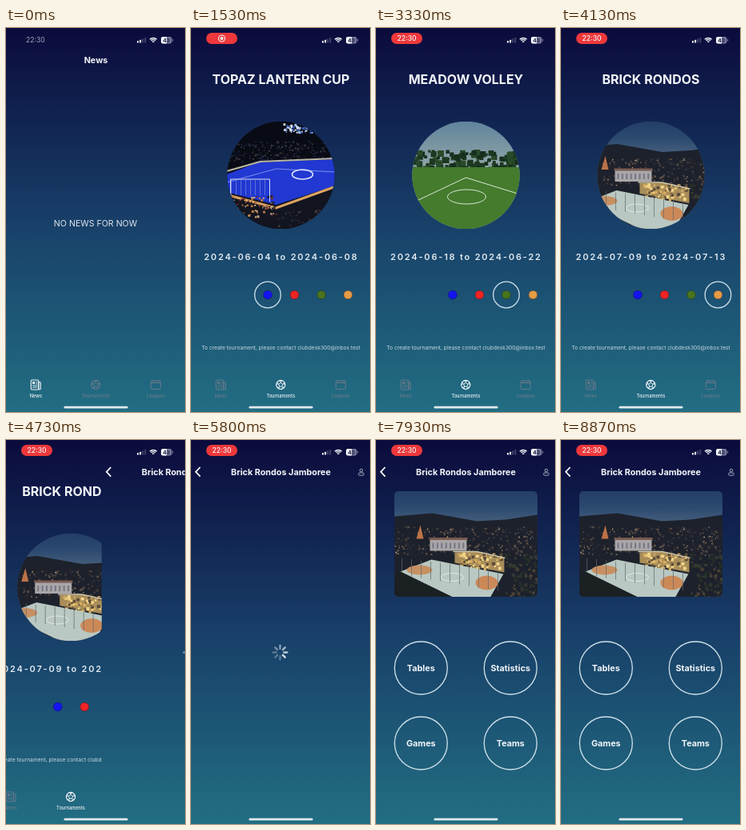
Write an HTML page with a canvas that moves like this. It is 224x480 px and loops after 8940 ms.

```html
<!DOCTYPE html>
<html lang="en">
<head>
<meta charset="utf-8">
<title>Tournament app</title>
<style>
html, body { margin: 0; width: 100%; height: 100%; overflow: hidden; background: #0b0b3c; }
canvas { display: block; }
</style>
</head>
<body>
<canvas id="stage"></canvas>
<script>
const W = 224, H = 480, LOOP = 8940;
const TAB_AT = 600, PUSH_AT = 4650, PUSH_TIME = 430, LOADED_AT = 6300;
const SWIPE_AT = 1750, SWIPE_GAP = 850, SWIPE_TIME = 500;
const PILL_AT = 300, PILL_CLOCK_AT = 3200;
const CX = 112.5, DOT_GAP = 33.5;
const WHITE = '#f1f4f8', DIM = '#66798a';

const canvas = document.getElementById('stage');
const c = canvas.getContext('2d');
const ratio = window.devicePixelRatio || 1;
canvas.width = W * ratio;
canvas.height = H * ratio;
canvas.style.width = W + 'px';
canvas.style.height = H + 'px';

const cups = [
  { name: 'TOPAZ LANTERN CUP', dates: '2024-06-04 to 2024-06-08', color: '#1414f2', photo: arena },
  { name: 'PANNA JUBILEE', dates: '2024-06-11 to 2024-06-15', color: '#f02424', photo: redCourt },
  { name: 'MEADOW VOLLEY', dates: '2024-06-18 to 2024-06-22', color: '#47741d', photo: greenPitch },
  { name: 'BRICK RONDOS', dates: '2024-07-09 to 2024-07-13', color: '#e59c45', photo: town }
];

const progress = (t, from, time) => Math.max(0, Math.min(1, (t - from) / time));
const smooth = p => p * p * (3 - 2 * p);
const easeOut = p => 1 - (1 - p) ** 3;
const repeat = (n, fn) => { for (let i = 0; i < n; i++) fn(i); };

function scoped(fn) {
  c.save();
  fn();
  c.restore();
}

function text(s, x, y, size, { weight = 400, color = WHITE, spacing = 0 } = {}) {
  c.font = `${weight} ${size}px Inter, Roboto, sans-serif`;
  c.letterSpacing = spacing + 'px';
  c.textAlign = 'center';
  c.fillStyle = color;
  c.fillText(s, x + spacing / 2, y + size * 0.364);
}

function fill(color, trace) {
  c.beginPath();
  trace();
  c.fillStyle = color;
  c.fill();
}

function stroke(color, width, trace) {
  c.beginPath();
  trace();
  c.strokeStyle = color;
  c.lineWidth = width;
  c.stroke();
}

function trace(xy) {
  for (let i = 0; i < xy.length; i += 2) c.lineTo(xy[i], xy[i + 1]);
}

const poly = (color, ...xy) => fill(color, () => trace(xy));
const line = (color, width, ...xy) => stroke(color, width, () => trace(xy));
const rect = (color, x, y, w, h, r = 0) => fill(color, () => c.roundRect(x, y, w, h, r));
const box = (color, width, x, y, w, h, r = 0) => stroke(color, width, () => c.roundRect(x, y, w, h, r));
const disc = (color, x, y, rx, ry = rx) => fill(color, () => c.ellipse(x, y, rx, ry, 0, 0, 7));
const ring = (color, width, x, y, rx, ry = rx) => stroke(color, width, () => c.ellipse(x, y, rx, ry, 0, 0, 7));

function gradient(y1, ...colors) {
  const g = c.createLinearGradient(0, 0, 0, y1);
  colors.forEach((color, i) => g.addColorStop(i / (colors.length - 1), color));
  return g;
}

// Seeded scatter of small patches: crowds, foliage and lights.
function scatter(count, size, x, y, w, h, ...colors) {
  let seed = count + 1;
  const random = () => (seed = seed * 16807 % 2147483647) / 2147483647;
  repeat(count, () => {
    const s = size * (0.4 + random() * 0.6);
    rect(colors[Math.floor(random() * colors.length)], x + random() * w, y + random() * h, s, s);
  });
}

// Photos fill a box of 180 x 134.
function arena() {
  rect('#090b14', 0, 0, 180, 134);
  scatter(260, 2, 22, 24, 136, 26, '#263049', '#33364a', '#4b4044', '#182443');
  scatter(60, 3, 93, 2, 36, 11, '#e8f0ff', '#a8c4ff', '#3a5ab0');
  poly('#2138d2', 22, 66, 62, 51, 158, 47, 158, 80, 86, 107, 22, 92);
  line('#b9b7a6', 2, 22, 62, 64, 50, 158, 46);
  line('#93a6f2', 0.8, 22, 76, 84, 59, 158, 63);
  ring('#dce5ff', 1.5, 117, 66, 13, 6);
  poly('#12141f', 22, 88, 84, 104, 158, 80, 158, 134, 22, 134);
  repeat(8, i => line('#8396d8', 0.6, 28 + i * 6, 73, 28 + i * 6, 92));
  line('#d6dcf0', 1, 27, 94, 27, 72, 76, 72, 76, 100);
  line('#dda561', 3, 24, 92, 84, 108, 156, 82);
  scatter(110, 3, 22, 92, 62, 28, '#b4713f', '#6d3030', '#171a2a', '#c9a87f');
  scatter(50, 3, 84, 110, 74, 24, '#222a3f', '#11131e', '#443a3a');
}

function redCourt() {
  rect('#1c2227', 0, 0, 180, 134);
  scatter(260, 4, 22, 0, 136, 46, '#25312d', '#2c3330', '#161b1d', '#343b3a');
  poly('#d8444c', 22, 35, 50, 28, 158, 57, 158, 84, 54, 119, 22, 102);
  poly('#252a35', 56, 27, 158, 38, 158, 58, 72, 36);
  repeat(3, i => rect('#a5a8b4', 74 + i * 26, 28 + i * 7, 5, 8));
  repeat(4, i => rect('#7698d8', 30 + i * 34, 73 - i * 3, 10, 2));
  disc('#315ea8', 56, 58, 13, 4.5);
  ring('#dbe2ed', 1.4, 56, 58, 13, 4.5);
  const curve = () => {
    c.moveTo(50, 121);
    c.bezierCurveTo(48, 88, 84, 84, 158, 77);
  };
  fill('#59616b', () => { curve(); c.lineTo(158, 134); c.lineTo(50, 134); });
  stroke('#4a80d0', 1.8, curve);
  poly('#454b51', 22, 102, 54, 119, 80, 134, 22, 134);
  repeat(9, i => line('#78838c', 0.6, 112 + i * 5, 80, 112 + i * 5, 118));
  line('#bdc7cd', 1, 112, 110, 113, 80, 148, 77, 148, 106);
  scatter(120, 6, 70, 108, 78, 28, '#303f32', '#222e27', '#465240');
}

function greenPitch() {
  rect(gradient(60, '#60849d', '#93a7a8'), 0, 0, 180, 134);
  scatter(130, 8, 22, 35, 136, 22, '#1d3821', '#294a29', '#172e1d');
  rect('#447b2d', 0, 57, 180, 77);
  line('#d8e7d3', 1, 22, 102, 90, 70, 158, 91);
  ring('#d8e7d3', 1, 91, 94, 24, 9);
}

function town() {
  rect(gradient(42, '#233f68', '#2c4a70', '#48607c'), 0, 0, 180, 134);
  poly('#1d212b', 0, 32, 48, 28, 104, 38, 140, 36, 180, 30, 180, 134, 0, 134);
  scatter(280, 3, 0, 44, 180, 36, '#2b2a30', '#493f3d', '#242832', '#5d5149');
  scatter(45, 1.5, 0, 44, 180, 36, '#d6a873', '#a37855', '#c9c0b3');
  poly('#bd7247', 28, 60, 33, 43, 37, 60);
  rect('#aaa6a8', 45, 61, 46, 14);
  line('#785b50', 3, 44, 60, 92, 60);
  repeat(8, i => rect('#747684', 48 + i * 5.4, 65, 2, 7));
  poly('#a98d59', 76, 77, 104, 76, 138, 84, 138, 102, 76, 90);
  scatter(70, 4, 78, 77, 56, 20, '#f2d589', '#594a3a', '#d6ad60');
  line('#cdc6aa', 1.3, 74, 76, 104, 76, 139, 84);
  poly('#b9c8c2', 8, 101, 47, 86, 137, 104, 120, 134, 75, 134);
  disc('#c79062', 32, 99, 16, 6);
  disc('#cc8958', 116, 115, 14, 9);
  ring('#eef1e7', 0.8, 73, 108, 14, 5);
  repeat(11, i => line('#61696b', 0.7, 10 + i * 12, 84 + i * 1.5, 10 + i * 12, 105 + i * 2));
  poly('#1b2023', 0, 104, 8, 101, 76, 134, 0, 134);
  scatter(90, 4, 138, 78, 42, 56, '#263128', '#343833', '#4f4336');
}

function background() {
  rect(gradient(H, '#0b0b3c', '#183f68', '#226e83'), 0, 0, W, H);
}

function newsIcon(x, y, color) {
  box(color, 1.1, x - 6, y - 6, 9.5, 12, 1.2);
  box(color, 1.1, x + 3.5, y - 3.5, 2.5, 9.5, 1.2);
  rect(color, x - 4.2, y - 4, 3, 3);
  repeat(4, i => line(color, 0.9, x - (i < 2 ? 0 : 4.2), y - 3.5 + i * 2.2, x + 2, y - 3.5 + i * 2.2));
}

function ballIcon(x, y, color) {
  ring(color, 1.1, x, y, 5.6);
  repeat(5, i => scoped(() => {
    c.translate(x, y);
    c.rotate(i * Math.PI * 0.4);
    line(color, 0.9, -1.4, -1.9, 0, -2.4, 1.4, -1.9);
    line(color, 0.9, 0, -2.4, 0, -4.2);
    line(color, 0.9, -2.2, -5.2, 0, -4.2, 2.2, -5.2);
  }));
}

function calendarIcon(x, y, color) {
  box(color, 1, x - 6, y - 5, 12, 10.5, 1);
  line(color, 1.2, x - 6, y - 2.6, x + 6, y - 2.6);
  repeat(2, i => line(color, 1, x - 3.5 + i * 7, y - 6.2, x - 3.5 + i * 7, y - 4.5));
}

function tabBar(active) {
  const icons = [newsIcon, ballIcon, calendarIcon];
  ['News', 'Tournaments', 'Leagues'].forEach((label, i) => {
    const x = 37.3 + i * 75, color = i === active ? WHITE : DIM;
    icons[i](x, 446, color);
    text(label, x, 460, 5.7, { weight: 500, color });
  });
}

function newsScreen() {
  background();
  text('News', CX, 40, 10.8, { weight: 700 });
  text('NO NEWS FOR NOW', 112, 244, 10.6, { color: '#dfe6ee' });
  tabBar(0);
}

function cupPage(cup, offset) {
  const x = CX + offset * W, scale = 1 - Math.abs(offset);
  if (scale <= 0) return;
  text(cup.name, x, 64.5, 16, { weight: 700 });
  text(cup.dates, x - 0.5, 286, 11, { weight: 600, color: '#e2eaf0', spacing: 1.8 });
  scoped(() => {
    c.translate(x, 184);
    c.scale(scale, scale);
    c.beginPath();
    c.arc(0, 0, 67.2, 0, 7);
    c.clip();
    c.translate(-90, -67);
    cup.photo();
  });
}

function tournamentsScreen(t) {
  background();
  let page = 0;
  repeat(cups.length - 1, i => page += smooth(progress(t, SWIPE_AT + i * SWIPE_GAP, SWIPE_TIME)));
  cups.forEach((cup, i) => {
    cupPage(cup, i - page);
    disc(cup.color, 96 + i * DOT_GAP, 333.5, 5.6);
    ring('rgba(20,25,50,.5)', 0.9, 96 + i * DOT_GAP, 333.5, 5.3);
  });
  ring('#cfe1ea', 1.3, 96 + page * DOT_GAP, 333.5, 16.3);
  text('To create tournament, please contact clubdesk300@inbox.test', CX, 400, 6.7, { color: '#cad8e0' });
  tabBar(1);
}

function spinner(t) {
  const head = Math.floor(t / 125);
  repeat(8, i => scoped(() => {
    const age = (head + 5 - i) % 8;
    c.translate(111.5, 265.5);
    c.rotate(i * Math.PI / 4);
    c.lineCap = 'round';
    line(`rgba(225,234,240,${Math.max(0.32, 0.92 - age * 0.12)})`, 2.4, 0, -4.8, 0, -8.8);
  }));
}

function detailScreen(t) {
  background();
  line('#fff', 1.7, 11.5, 34, 6, 39.8, 11.5, 45.6);
  text('Brick Rondos Jamboree', CX, 40, 10.8, { weight: 700 });
  ring('#aab0c6', 0.9, 213, 38, 1.8);
  box('#aab0c6', 0.9, 209.6, 41, 6.8, 3.2, 1.4);
  if (t < LOADED_AT) return spinner(t);
  scoped(() => {
    c.beginPath();
    c.roundRect(23, 64, 179, 132, 5);
    c.clip();
    c.translate(22.5, 63.5);
    town();
  });
  ['Tables', 'Statistics', 'Games', 'Teams'].forEach((label, i) => {
    const x = 56.3 + (i % 2) * 112, y = 285 + (i >> 1) * 94;
    ring('#cfe1ea', 1.3, x, y, 33);
    text(label, x, y, 10.8, { weight: 700 });
  });
}

function statusBar(t) {
  if (t < PILL_AT) {
    text('22:30', 36.8, 15, 8.6, { color: '#a2a6bd' });
  } else {
    rect('#ee383b', 19, 6, 39, 14, 7);
    if (t < PILL_CLOCK_AT) {
      ring(WHITE, 1.1, 38.5, 13, 4);
      disc(WHITE, 38.5, 13, 2);
    } else {
      text('22:30', 38.5, 13, 8.6, { weight: 500 });
    }
  }
  repeat(4, i => {
    const h = 2.4 + i * 1.4;
    rect(i < 2 ? WHITE : 'rgba(255,255,255,.22)', 164 + i * 3.1, 18.5 - h, 2, h, 0.5);
  });
  repeat(3, i => stroke(WHITE, 1.5, () => c.arc(184.3, 18.6, 1.6 + i * 2.3, -Math.PI * 0.75, -Math.PI * 0.25)));
  rect('#77789a', 194, 11, 13.5, 8.4, 2.6);
  rect(WHITE, 194, 11, 7, 8.4, [2.6, 0, 0, 2.6]);
  rect('#77789a', 208.2, 13.7, 1, 3, 0.5);
  text('43', 200.7, 15.2, 6.8, { weight: 700, color: '#20204a' });
}

function draw(t) {
  const push = easeOut(progress(t, PUSH_AT, PUSH_TIME));
  c.setTransform(ratio, 0, 0, ratio, 0, 0);
  if (t < TAB_AT) {
    newsScreen();
  } else if (push < 1) {
    scoped(() => {
      c.translate(-push * W * 0.3, 0);
      tournamentsScreen(t);
    });
  }
  if (push > 0) {
    scoped(() => {
      c.translate((1 - push) * W, 0);
      detailScreen(t);
    });
  }
  statusBar(t);
  rect('#e2eaee', 72.5, 472.8, 80, 2.8, 1.4);
}

const start = performance.now();
function tick() {
  draw((performance.now() - start) % LOOP);
  requestAnimationFrame(tick);
}
tick();
</script>
</body>
</html>
```
